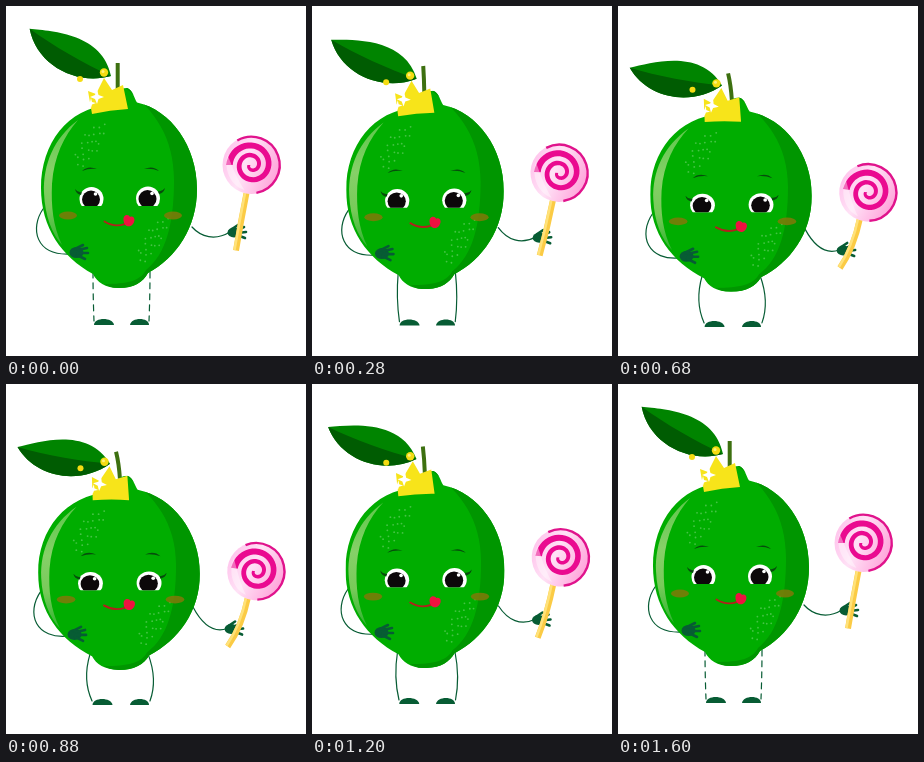
An HTML page that plays this animation: 300 by 350 pixels, repeating every 1680 ms.

```html
<!DOCTYPE html>
<html lang="en">
<head>
<meta charset="utf-8">
<title>Lime with a lollipop</title>
<style>
  html, body { margin: 0; height: 100%; overflow: hidden; background: #fff; }
  svg { display: block; width: 100vw; height: 100vh; }
  .line { fill: none; stroke: #075c34; stroke-width: 1.2; stroke-linecap: round; }
  .skin { fill: #075c34; }
  .finger { fill: none; stroke: #075c34; stroke-width: 2.6; stroke-linecap: round; }
  .brow { fill: #064d0c; }
</style>
</head>
<body>
<svg viewBox="0 0 300 350">
  <defs>
    <linearGradient id="shine" x1="0" y1="0" x2="0" y2="1">
      <stop offset="0" stop-color="#5cc84a"/>
      <stop offset=".4" stop-color="#86d068"/>
      <stop offset=".7" stop-color="#78ca5a"/>
      <stop offset="1" stop-color="#2fb52f"/>
    </linearGradient>
    <linearGradient id="candy" x1="0" y1=".3" x2="1" y2=".7">
      <stop offset="0" stop-color="#ffc4ec"/>
      <stop offset=".4" stop-color="#ffe2f6"/>
      <stop offset="1" stop-color="#ff9fd8"/>
    </linearGradient>
    <clipPath id="peel">
      <path d="M103 99C106 90 113 82 121 82C127 84 128 92 131 96.500C165 104 191 140 191 183C191 222 170 252 142 267C137 276 128 282 113 282C99 282 91 276 87 268C56 251 35 222 35 182C35 137 62 102 103 99Z"/>
    </clipPath>
    <clipPath id="lid"><rect x="60" y="175" width="110" height="25"/></clipPath>
  </defs>

  <path id="legL" class="line"/>
  <path id="legR" class="line"/>
  <path id="footL" class="skin" d="M88 319C88 311 107 311 108 319Z"/>
  <path id="footR" class="skin" d="M124 319C125 311 143 311 143 319Z"/>
  <path id="armL" class="line"/>
  <path id="armR" class="line"/>

  <g id="leaf">
    <path fill="#008400" d="M-94 0C-72 -10 -28 -32 0 0C-25 26 -70 28 -94 0Z"/>
    <path fill="#005c02" d="M-94 0C-65 3 -30 3 0 0C-25 26 -70 28 -94 0Z"/>
  </g>
  <path id="stem" fill="none" stroke="#3d7010" stroke-width="4"/>

  <g id="body">
    <g clip-path="url(#peel)">
      <rect x="30" y="80" width="165" height="205" fill="#00ad00"/>
      <path fill="#009600" d="M117 80C147 102 168 130 168 174C168 218 160 248 140 264C134 275 122 278 98 278L113 285H200V80Z"/>
      <path fill="url(#shine)" d="M72 114C48 132 37 158 38 187C39 210 46 228 56 239C47 220 45 200 46 178C48 150 58 130 72 114Z"/>
    </g>
    <g id="pores" fill="#45c445"/>
    <g fill="#7d7a08" opacity=".88">
      <ellipse cx="62" cy="209.500" rx="9" ry="4"/>
      <ellipse cx="167" cy="209.500" rx="9" ry="4"/>
    </g>
    <g clip-path="url(#lid)">
      <g id="eye">
        <circle cx="85.500" cy="193" r="12" fill="#fff"/>
        <circle cx="85" cy="193.500" r="9" fill="#0c080a"/>
        <circle cx="89.500" cy="188" r="1.800" fill="#fff"/>
      </g>
      <use href="#eye" x="56.500" y="-.5"/>
    </g>
    <path class="brow" d="M76 165Q82 159 91 163Q83 162 76 165ZM138 163Q147 159 153 165Q146 162 138 163Z"/>
    <path class="brow" d="M69 183Q72 187 76 186L75 189Q70 188 69 183ZM159 182Q156 186 152 185L153 188Q158 187 159 182Z"/>
    <path fill="none" stroke="#b3201c" stroke-width="1.900" stroke-linecap="round" d="M98.500 215.500Q112 224 126 214"/>
    <path fill="#ee1240" d="M117.500 214C117 208 123 208 124 211C128 209 130 214 127 218C124 222 118 221 117.500 214Z"/>
  </g>

  <g id="crown">
    <path fill="#f7e41a" d="M86 108L82 85L90 88L98 72L106 84L117 79L122 103Q104 104 86 108Z"/>
    <path fill="#fff" d="M91 83L92.500 89L98 91L92.500 93L91 98L89 93L84 91L89 89ZM85 92L86 96L90 97L86 98.500L85 102L83 98L81 97L84 96Z"/>
  </g>
  <g id="beads" fill="#f5dc12">
    <circle cx="74" cy="73" r="3"/>
    <circle cx="98" cy="66.500" r="4.200"/>
    <circle cx="97" cy="65.500" r="1.500" fill="#fff27a"/>
  </g>

  <g id="handL">
    <ellipse class="skin" cx="70.500" cy="246.500" rx="7" ry="5.500"/>
    <path class="finger" d="M69 243L77 239M72 244L81 242M72 247L82 247M71 249L79 253"/>
  </g>
  <g id="handR">
    <ellipse class="skin" cx="228" cy="226.500" rx="6.500" ry="5"/>
    <path class="finger" d="M226 223L232 219M231 224L238 221M231 227L240 226M231 229L239 232"/>
  </g>

  <path id="stick" fill="none" stroke="#fbcb45" stroke-width="6"/>
  <path id="glint" fill="none" stroke="#ffe27a" stroke-width="2.500"/>
  <g id="pop">
    <circle r="29" fill="url(#candy)"/>
    <path fill="none" stroke="#e0138c" stroke-width="2.400" d="M-14.200 -24.500A28.300 28.300 0 1 1 4.900 27.900"/>
    <path id="swirl" fill="#ea0a90"/>
    <path fill="#fff" opacity=".4" d="M-24 -10C-28 6 -20 21 -7 25C-15 13 -19 2 -24 -10Z"/>
  </g>
</svg>

<script>
const $ = id => document.getElementById(id);
const set = (id, name, value) => $(id).setAttribute(name, value);
const mix = (a, b, p) => a + (b - a) * p;

// Blends two lists of coordinates into the slots of a path template.
function blend(id, template, from, to, p) {
  let i = 0;
  set(id, 'd', template.replace(/#/g, () => mix(from[i], to[i++], p).toFixed(2)));
}
const shift = (id, x, y) => set(id, 'transform', `translate(${x} ${y})`);

function addPores(cx, cy, rx, ry, tilt, count) {
  for (let i = 0; i < count; i++) {
    const r = Math.sqrt((i + .5) / count), a = i * 2.39996;
    const x = Math.cos(a) * r * rx, y = Math.sin(a) * r * ry;
    const dot = document.createElementNS('http://www.w3.org/2000/svg', 'circle');
    dot.setAttribute('cx', cx + x * Math.cos(tilt) - y * Math.sin(tilt));
    dot.setAttribute('cy', cy + x * Math.sin(tilt) + y * Math.cos(tilt));
    dot.setAttribute('r', .9);
    $('pores').append(dot);
  }
}

// A ribbon that winds inwards from the left and gets thinner.
function spiral(turns, outer, inner) {
  const steps = 80, edge = side => Array.from({ length: steps + 1 }, (_, i) => {
    const k = i / steps, a = Math.PI + k * turns * 2 * Math.PI;
    const r = mix(outer, inner, k) + side * mix(3.2, 1.6, k);
    return (Math.cos(a) * r).toFixed(2) + ' ' + (Math.sin(a) * r).toFixed(2);
  });
  return 'M' + [...edge(1), ...edge(-1).reverse()].join('L') + 'Z';
}

const CURVE = 'M# #C# # # # # #', BEND = 'M# #Q# # # #';

function pose(p) {
  set('body', 'transform', `matrix(${1 + .038 * p} 0 0 ${1 - .03 * p} ${-4.3 * p} ${12.5 * p})`);
  set('leaf', 'transform',
    `translate(${mix(105, 104, p)} ${mix(70, 80, p)}) rotate(${mix(30.1, 9.7, p)})`);
  blend('stem', BEND, [111.7, 57, 111.7, 70, 111.7, 84], [110, 68, 113, 80, 114, 95], p);
  set('crown', 'transform', `translate(${p} ${11 * p}) rotate(${8 * p} 104 105)`);
  shift('beads', .5 * p, 11.5 * p);

  blend('armL', CURVE, [37, 203, 24, 222, 29, 250, 65, 248], [35, 207, 19, 230, 30, 256, 63, 252], p);
  blend('armR', CURVE, [186, 221, 195, 231, 209, 235, 224, 226],
    [187, 223, 197, 242, 209, 249, 221, 245], p);
  shift('handL', -2 * p, 4 * p);
  shift('handR', -3 * p, 19 * p);

  blend('legL', BEND, [87, 266, 87, 290, 88, 315], [84, 270, 76, 296, 86, 317], p);
  blend('legR', BEND, [144, 266, 144, 290, 143, 315], [142, 270, 152, 296, 144, 317], p);
  for (const id of ['legL', 'legR']) set(id, 'stroke-dasharray', p < .004 ? '6 5' : 'none');
  shift('footL', -1.5 * p, 2 * p);
  shift('footR', 0, 2 * p);

  const x = 245.5 + 8 * p - 3.2 * p * p, y = 159 + 29 * p;
  set('pop', 'transform', `translate(${x} ${y}) rotate(${8 * p})`);
  blend('stick', BEND, [240.5, 187, 235, 215, 230, 244.5], [242, 214, 236, 243, 221.5, 263], p);
  blend('glint', BEND, [239, 187, 233.5, 215, 228.5, 244], [240.5, 213, 234.5, 242, 220.5, 262], p);
}

addPores(84, 139, 27, 10, -1, 24);
addPores(147, 234, 28, 9, -1, 24);
set('swirl', 'd', spiral(2, 22, 2.5));

// A 1.6 s swing on 40 ms ticks; the last tick is held twice as long.
function frame(now) {
  const t = Math.min(Math.floor(now % 1680 / 40) * 40, 1600);
  pose((1 - Math.cos(t / 1600 * 2 * Math.PI)) / 2);
  requestAnimationFrame(frame);
}
pose(0);
requestAnimationFrame(frame);
</script>
</body>
</html>
```
